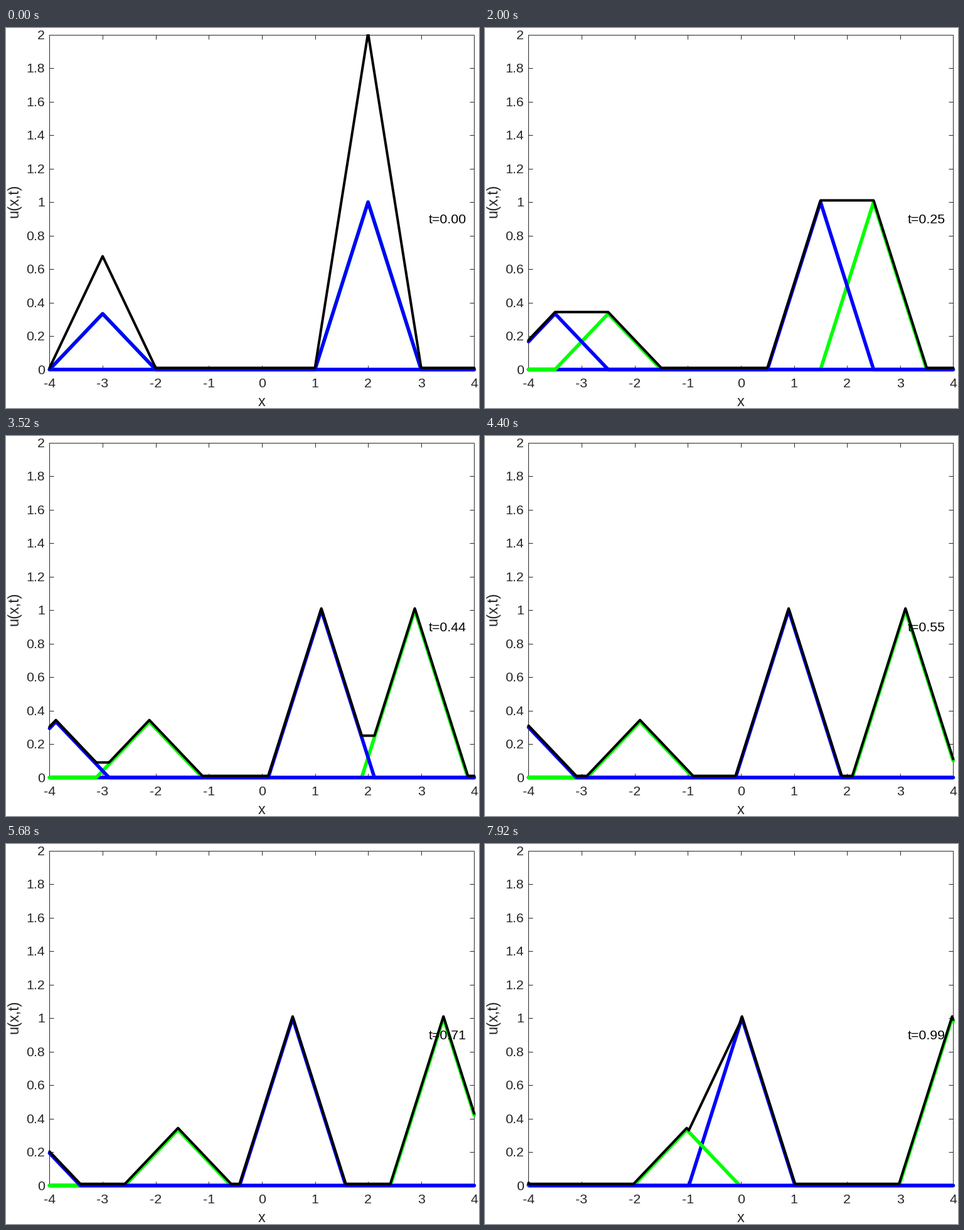
These frames come from a looping animation (754x607 px, 8000 ms). A matplotlib script:

```python
import matplotlib.pyplot as plt
import numpy as np
from matplotlib.animation import FuncAnimation
from matplotlib.transforms import Bbox, TransformedBbox

W, H, DPI = 754, 607, 64
PT = 72 / DPI  # points per pixel
LEFT, RIGHT, TOP, BOTTOM = 69.4, 746.4, 10.55, 545.55
FRAMES, INTERVAL = 100, 80
SPEED, DT = 2, 0.01
OFFSET = 0.01  # lifts the sum just above its components
INK = "0.15"
GREEN, BLUE = "#00ff00", "#0000ff"

plt.rcParams.update({"font.family": "Liberation Sans", "path.simplify": False})

fig = plt.figure(figsize=(W / DPI, H / DPI), dpi=DPI, facecolor="white")
ax = fig.add_axes([LEFT / W, 1 - BOTTOM / H, (RIGHT - LEFT) / W, (BOTTOM - TOP) / H])
ax.set(xlim=(-4, 4), ylim=(0, 2), xticks=range(-4, 5), yticks=np.arange(11) / 5)
ax.tick_params(direction="in", top=True, right=True, labelbottom=False,
               labelleft=False, length=6.8 * PT, width=PT, color=INK)
for spine in ax.spines.values():
    spine.set(linewidth=PT, edgecolor=INK)


def label(x, y, text, size=21.33, color=INK, **kw):
    """Place text with its baseline at pixel (x, y), measured from the top left."""
    return fig.text(x / W, 1 - y / H, text, fontsize=size * PT, color=color,
                    va="baseline", **kw)


for k in range(-4, 5):
    label(LEFT + (k + 4) * (RIGHT - LEFT) / 8, 574.5, str(k), ha="center")
for k in range(11):
    y = BOTTOM - k * (BOTTOM - TOP) / 10
    label(62, y + 7.3, f"{k / 5:g}", ha="right")
label(408, 604.5, "x", 23.46, ha="center")
label(19.5, 276.5, "u(x,t)", 23.46, ha="center", rotation=90, rotation_mode="anchor")
clock = label(674, 312.5, "", color="black", ha="left")

# Strokes may overhang the frame on every side except the top.
clip = TransformedBbox(Bbox.from_extents(0, 0, 1, 1 - (TOP - 0.55) / H),
                       fig.transFigure)


def curve(color, width):
    line, = ax.plot([], [], color=color, lw=width * PT, zorder=3,
                    solid_capstyle="round", solid_joinstyle="round")
    line.set_clip_box(clip)
    line.set_snap(False)
    return line


# (centre, height, direction, colour) of each travelling pulse, back to front
PULSES = [(2, 1, 1, GREEN), (2, 1, -1, BLUE),
          (-3, 1 / 3, 1, GREEN), (-3, 1 / 3, -1, BLUE)]
waves = [curve(color, 5.6) for *_, color in PULSES]
total = curve("black", 4)
x = np.linspace(-4, 4, 801)


def tent(s):
    return np.maximum(0, 1 - np.abs(s))


def update(frame):
    t = frame * DT
    heights = [height * tent(x - centre - direction * SPEED * t)
               for centre, height, direction, _ in PULSES]
    for wave, u in zip(waves, heights):
        wave.set_data(x, u)
    total.set_data(x, sum(heights) + OFFSET)
    clock.set_text(f"t={t:.2f}")
    return *waves, total, clock


anim = FuncAnimation(fig, update, frames=FRAMES, interval=INTERVAL,
                     repeat=True, repeat_delay=0, blit=False)
plt.show()
```
